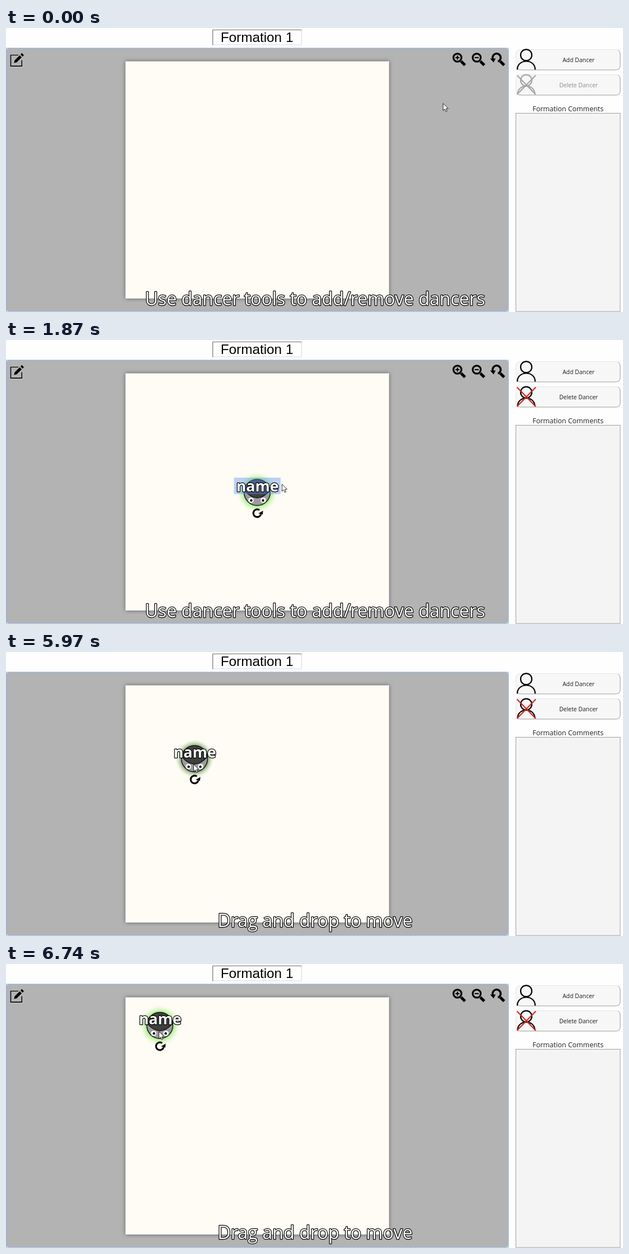
An HTML page for the animation above (8000 ms loop, 1103 px wide and 508 px high).

```html
<!DOCTYPE html>
<html lang="en">
<head>
<meta charset="utf-8">
<title>Formation editor</title>
<style>
  html, body { margin: 0; width: 100%; height: 100%; overflow: hidden; background: #fefefe; }
  svg { display: block; width: 100vw; height: 100vh; }
  text { font-family: "Open Sans", "Noto Sans", sans-serif; text-anchor: middle; }
  .title { font: 24.3px "Liberation Sans", Arial, sans-serif; }
  .label { font-size: 10.45px; fill: #1c1c1c; }
  .outlined { fill: #fff; stroke: #000; stroke-width: 2.4; stroke-linejoin: round; paint-order: stroke; }
  .line { fill: none; stroke: #000; stroke-width: 2.2; }
  .off .label { fill: #8d8d8d; }
  .off .line { stroke: #a6a6a6; }
</style>
</head>
<body>
<svg viewBox="0 0 1103 508" preserveAspectRatio="none">
  <defs>
    <filter id="shadow" x="-10%" y="-10%" width="120%" height="120%">
      <feDropShadow dx="0" dy="0" stdDeviation="3.6" flood-color="#000" flood-opacity=".5"/>
    </filter>
    <radialGradient id="bright">
      <stop offset=".58" stop-color="#84e85a" stop-opacity=".85"/>
      <stop offset=".74" stop-color="#a2ee80" stop-opacity=".48"/>
      <stop offset=".88" stop-color="#c0f3a6" stop-opacity=".15"/>
      <stop offset="1" stop-color="#c8f5b0" stop-opacity="0"/>
    </radialGradient>
    <radialGradient id="dim">
      <stop offset=".64" stop-color="#55803f"/>
      <stop offset=".8" stop-color="#86a972" stop-opacity=".5"/>
      <stop offset="1" stop-color="#b5cca5" stop-opacity="0"/>
    </radialGradient>
    <g id="button">
      <rect x="911.5" y="38.5" width="186.5" height="36.5" rx="8" stroke="#e6e6e6"/>
      <path d="M914 73.5Q916 75 920 75H1090Q1098 75 1098 67V46Q1098 41 1094 39" fill="none" stroke="#a4a4a4"/>
    </g>
    <path id="handle" d="M6.5 6.5L13.5 13.5" stroke="#000" stroke-width="5.2"/>
    <g id="lens">
      <use href="#handle"/>
      <circle r="7.2" fill="none" stroke="#000" stroke-width="3.2"/>
    </g>
  </defs>

  <rect width="1103" height="508" fill="#fefefe"/>
  <rect x="369" y="3" width="160" height="27.5" fill="#fff"/>
  <path d="M528.5 3V30H369" fill="none" stroke="#d8d8d8"/>
  <path d="M369.6 30.5V3.4H528.5" fill="none" stroke="#858585" stroke-width="1.4"/>
  <text class="title" x="448.6" y="25">Formation 1</text>

  <rect x=".5" y="36" width="897.5" height="471" rx="5" fill="#b3b3b3"/>
  <rect id="outline" x=".5" y="36" width="897.5" height="471" fill="none" stroke-width="1.2"/>
  <rect x="213.7" y="59.8" width="471" height="424" fill="#fffcf5" filter="url(#shadow)"/>

  <g id="tools">
    <path d="M22 48.5H8.5V68.2H28.3V57.5" fill="none" stroke="#d6d6d6" stroke-width="2.8"/>
    <path d="M22 48.5H8.5V68.2H28.3V57.5" fill="none" stroke="#000" stroke-width="1.7"/>
    <path d="M13.8 63L15.2 57.8 24.4 48.6 28.4 52.6 19.2 61.7ZM25.5 47.3L28.3 44.6 32.3 48.6 29.6 51.4Z"
      stroke="#d6d6d6" stroke-width=".5"/>
    <g transform="translate(807 53)"><use href="#lens"/><path d="M-3.6 0H3.6M0-3.6V3.6" stroke="#000" stroke-width="2.1"/></g>
    <g transform="translate(841.5 53)"><use href="#lens"/><path d="M-3.6 0H3.6" stroke="#000" stroke-width="2.1"/></g>
    <g transform="translate(877 53)">
      <use href="#handle"/>
      <path d="M-6.8 2A7.2 7.2 0 1 1 2.5 6.8" fill="none" stroke="#000" stroke-width="3.5"/>
      <path d="M-11.5 1.5H-1.5L-5.5 8.5Z"/>
    </g>
  </g>

  <g>
    <use id="addFill" href="#button"/>
    <circle class="line" cx="930" cy="48.4" r="10"/>
    <path class="line" d="M914 74.5C914 54.5 946 54.5 946 74.5"/>
    <text class="label" x="1023.5" y="61">Add Dancer</text>
  </g>
  <g id="remove">
    <use href="#button" y="45" fill="#f7f7f7"/>
    <circle class="line" cx="930" cy="93.6" r="10"/>
    <path class="line" d="M914.5 118.5C915 99 945 99 945.5 118.5"/>
    <path id="cross" class="line" d="M913.5 84.5L947 119M947 84.5L913.5 119"/>
    <text class="label" x="1023.5" y="106">Delete Dancer</text>
  </g>
  <text x="1004.7" y="149" font-size="12.45" fill="#222">Formation Comments</text>
  <rect x="911.5" y="152.5" width="186.5" height="354.5" fill="#f4f4f4" stroke="#a0a0a0"/>

  <g id="dancer">
    <circle id="glow"/>
    <circle r="23.3" fill="#9c9c9c" stroke="#161616" stroke-width="1.5"/>
    <path d="M-23-4Q0 23 23-4A23.3 23.3 0 0 0-23-4Z" fill="#404040" stroke="#161616" stroke-width="1.5"/>
    <g fill="#fff"><circle cx="-11" cy="14" r="4.8"/><circle cx="11" cy="14" r="4.8"/></g>
    <circle cx="-10.5" cy="14.3" r="2.2"/><circle cx="10.5" cy="14.3" r="2.2"/>
    <g transform="translate(0 37)">
      <path d="M4.2-5.5A6.9 6.9 0 1 0 6.7 2" fill="none" stroke="#000" stroke-width="3.2"/>
      <path d="M2.2 .5L10.5-4.5 9.8 2.5Z"/>
    </g>
    <rect id="selection" x="-41.5" y="-26.5" width="83.5" height="29.5" fill="#5a8cf6" opacity=".4"/>
    <text class="outlined" x=".7" y="-1.8" font-size="26.8" font-weight="700">name</text>
  </g>

  <text id="caption" class="outlined" x="552.5"></text>
  <path id="cursor" d="M.4 .8V13.8L3.4 10.9 5.4 15.6 7.5 14.7 5.6 10.1H9.5Z" fill="#fff" stroke="#111" stroke-width=".9"/>
</svg>

<script>
const LOOP = 8000;
const el = id => document.getElementById(id);
const place = (node, [, x, y]) => node.setAttribute("transform", `translate(${x} ${y})`);
const show = (node, on) => node.setAttribute("visibility", on ? "visible" : "hidden");

// Sampled, eased travel from a to b, one pose per screen update.
function glide(times, a, b) {
  return times.map((t, i) => {
    const u = (i + 1) / times.length;
    const k = u * u * (3 - 2 * u);
    return [t, a[0] + (b[0] - a[0]) * k, a[1] + (b[1] - a[1]) * k];
  });
}

const rest = [781, 134], onButton = [950, 54], byName = [493, 257];
const cursorPath = [
  [0, ...rest],
  ...glide([300, 380, 460, 540, 620, 710], rest, onButton),
  ...glide([1560, 1640, 1720, 1790, 1870], onButton, byName),
  [5100, 488, 260], [5180, 467, 271], [5260, 447, 283],
  [5560, 446, 282], [5640, 433, 276], [5720, 402, 261], [5800, 366, 244], [5890, 343, 210], [5970, 335, 200],
  [6200, 308, 174], [6280, 283, 150], [6350, 278, 142], [6430, 276, 134],
  [6510, 274, 127], [6590, 273, 122], [6740, 273, 120]
];
const dancerPath = [
  [0, 449, 272.7],
  [5640, 444, 270], [5720, 421, 259], [5800, 391, 241.7], [5890, 353, 207], [5970, 337, 191],
  [6200, 316, 170], [6280, 284.5, 141.7], [6350, 280, 134], [6430, 278, 125],
  [6510, 276, 118], [6590, 275, 112], [6740, 275, 110]
];
const poseAt = (path, t) => path.findLast(p => p[0] <= t);

function draw(t) {
  const pointer = poseAt(cursorPath, t);
  const [, x, y] = pointer;
  const inPanel = x < 898;
  const overAdd = x > 911 && y > 38 && y < 75;
  const added = t >= 940;
  const dragging = t >= 5560 && t < 6740;
  const moving = t >= 5100;

  place(el("cursor"), pointer);
  place(el("dancer"), poseAt(dancerPath, t));
  el("dancer").style.display = added ? "" : "none";
  show(el("tools"), !dragging);
  el("selection").style.display = t >= 1040 && t < 5560 ? "" : "none";

  el("glow").setAttribute("r", dragging ? 34 : 38);
  el("glow").setAttribute("fill", dragging ? "url(#dim)" : "url(#bright)");
  el("outline").setAttribute("stroke", inPanel ? "#8baee6" : "#4a6fab");
  el("outline").setAttribute("rx", inPanel ? 1 : 5);
  el("addFill").setAttribute("fill", overAdd ? "#fdfdfd" : "#f7f7f7");
  el("remove").setAttribute("class", added ? "" : "off");
  el("cross").style.stroke = added ? "#d3261c" : "";

  const caption = el("caption");
  caption.textContent = moving ? "Drag and drop to move" : "Use dancer tools to add/remove dancers";
  caption.setAttribute("y", moving ? 492 : 496);
  caption.setAttribute("font-size", moving ? 32.3 : 32.15);
}

function tick() {
  draw(performance.now() % LOOP);
  requestAnimationFrame(tick);
}
tick();
</script>
</body>
</html>
```
